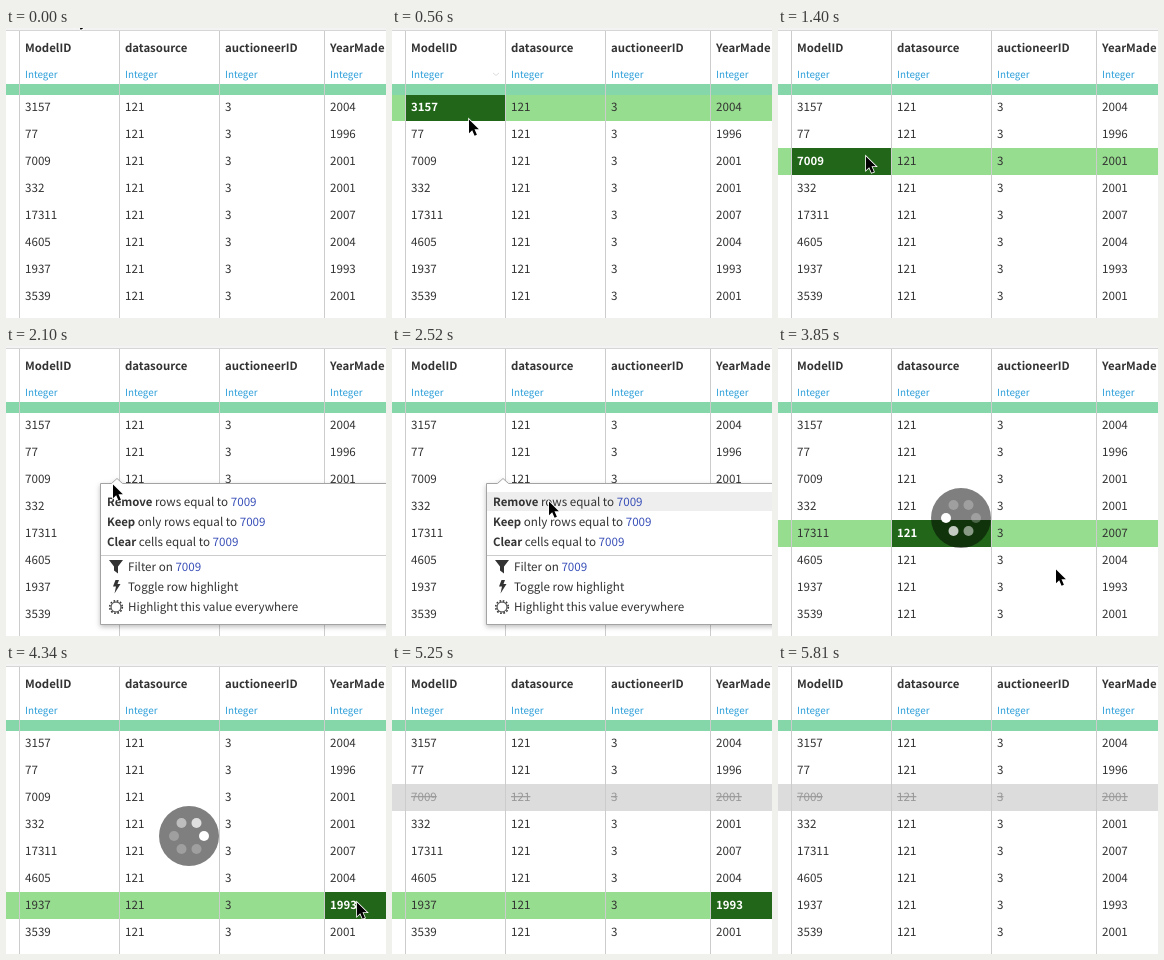
An HTML page for the animation above (6.23 s loop, 380 px wide and 290 px high).

```html
<!DOCTYPE html>
<html lang="en">
<head>
<meta charset="utf-8">
<title>Removing rows from a data table</title>
<style>
  html, body { margin: 0; width: 100%; height: 100%; overflow: hidden; background: #fff; }
  svg { display: block; }
  text {
    font: 11.64px "Noto Sans CJK JP", "Noto Sans CJK SC", "Noto Sans CJK", "Open Sans", sans-serif;
    fill: #333; text-rendering: geometricPrecision;
  }
  .bold { font-weight: 700; font-size: 11.4px; }
  .type { font-size: 9.85px; fill: #2d9fd9; }
  .active { font-weight: 700; font-size: 11.4px; fill: #fff; }
  .removed { fill: #999; text-decoration: line-through; }
  .value { fill: #3a50b8; }
  .box { filter: drop-shadow(0 2px 2.5px rgba(0, 0, 0, .25)); }
</style>
</head>
<body>
<svg id="stage" width="380" height="290" viewBox="0 0 380 290"></svg>
<script>
const LOOP = 6230, STEP = 70;
const ROW_TOP = 66, ROW_H = 27;
const edges = [13, 113, 213, 318, 418];
const headers = ['ModelID', 'datasource', 'auctioneerID', 'YearMade'];
const models = [3157, 77, 7009, 332, 17311, 4605, 1937, 3539];
const years = [2004, 1996, 2001, 2001, 2007, 2004, 1993, 2001];
const rows = models.map((m, i) => [m, 121, 3, years[i]]);

// time, x, y
const path = [
  [0, 68, -16], [280, 72, 50], [560, 76, 90], [630, 77, 95], [1120, 84, 125],
  [1260, 84, 125], [1400, 87, 127], [1750, 87, 127], [1820, 87, 130], [1960, 87, 130],
  [2240, 124, 143], [2520, 156, 154], [3290, 156, 154], [3570, 205, 186],
  [3850, 277, 222], [4060, 314, 230], [4340, 350, 237]
];
// time, row, column, opacity
const hovers = [
  [0, -1, 0, 0], [420, 0, 0, 1], [630, 1, 0, 1], [910, 2, 0, 1], [2100, -1, 0, 0],
  [3430, 3, 1, 1], [3640, 4, 1, 1], [3920, 5, 2, 1], [4200, 6, 3, 1],
  [5740, 6, 3, .5], [5810, -1, 0, 0]
];

const within = (t, a, b) => t >= a && t < b;
const rect = (x, y, w, h, fill, extra = '') =>
  `<rect x="${x}" y="${y}" width="${w}" height="${h}" fill="${fill}" ${extra}/>`;
const label = (x, y, s, cls = '') => `<text x="${x}" y="${y}" class="${cls}">${s}</text>`;

function cursorAt(t) {
  const i = path.findIndex(p => p[0] > t);
  if (i < 0) return path[path.length - 1].slice(1);
  const [t0, x0, y0] = path[i - 1], [t1, x1, y1] = path[i];
  const k = (t - t0) / (t1 - t0);
  return [x0 + (x1 - x0) * k, y0 + (y1 - y0) * k].map(Math.round);
}

function table(t) {
  const [, hotRow, hotCol, alpha] = hovers.filter(h => h[0] <= t).pop();
  const gone = t >= 4830 ? 2 : -1;
  const y = r => ROW_TOP + ROW_H * r;
  let out = rect(0, 0, 380, 2, '#f3f3f3') + rect(0, 2, 380, 1, '#d6d6d6');
  if (gone >= 0) out += rect(0, y(gone), 380, ROW_H, '#dcdcdc');
  if (hotRow >= 0) out += rect(0, y(hotRow), 380, ROW_H, '#97dd8f', `opacity="${alpha}"`);
  out += rect(0, 56, 380, 11, '#85d6a9');
  for (const x of edges) out += rect(x, 3, 1, 287, '#ccc');
  if (hotRow >= 0) {
    const x = edges[hotCol] + 1, top = Math.max(67, y(hotRow));
    out += rect(x, top, edges[hotCol + 1] - x, y(hotRow + 1) - top, '#226619', `opacity="${alpha}"`);
  }
  headers.forEach((name, c) => {
    out += label(edges[c] + 6, 24, name, 'bold') + label(edges[c] + 6, 50, 'Integer', 'type');
  });
  rows.forEach((cells, r) => cells.forEach((v, c) => {
    const cls = r === hotRow && c === hotCol ? 'active' : r === gone ? 'removed' : '';
    out += label(edges[c] + 6, y(r) + 17, v, cls);
  }));
  if (within(t, 140, 630)) {
    const tone = t < 420 ? '#aaa' : '#ddd';
    out += `<path d="M101 45l3 2.5 3-2.5" fill="none" stroke="${tone}"/>`;
  }
  return out;
}

function menu(t) {
  if (!within(t, 1680, 3290)) return '';
  const value = '<tspan class="value">7009</tspan>';
  const bold = s => `<tspan class="bold">${s}</tspan>`;
  return `<path class="box" d="M94.5 137.5H105.5L111 132.5L116.5 137.5H400V278.5H94.5Z" fill="#fff" stroke="#a3a3a3"/>`
    + (t >= 2310 ? rect(95, 146, 285, 19, '#eee') : '')
    + rect(95, 209, 285, 1, '#ccc')
    + label(101, 160, `${bold('Remove')} rows equal to ${value}`)
    + label(101, 180, `${bold('Keep')} only rows equal to ${value}`)
    + label(101, 200, `${bold('Clear')} cells equal to ${value}`)
    + label(122, 225, `Filter on ${value}`)
    + label(122, 245, 'Toggle row highlight')
    + label(122, 265, 'Highlight this value everywhere')
    + `<path d="M103 214H117L112 220.5V227.500L108 224.500V220.500Z" fill="#333"/>`
    + `<path d="M109.500 234H113L111.500 238H114.500L108.500 247.500L110 240.500H107Z" fill="#333"/>`
    + `<g fill="none" stroke="#333"><circle cx="110" cy="261" r="5"/>`
    + `<circle cx="110" cy="261" r="6.300" stroke-width="1.600" stroke-dasharray="1.650"/></g>`;
}

function spinner(t) {
  if (!within(t, 3360, 4830)) return '';
  const phase = (Math.min(t, 4690) - 3850) / 163;
  let out = '<circle cx="183" cy="172" r="30" opacity=".5"/>';
  for (let i = 0; i < 6; i++) {
    const a = Math.PI * (1 + i / 3);
    const age = (((phase - i) % 6) + 6) % 6;
    out += `<circle cx="${183 + 15 * Math.cos(a)}" cy="${172 + 15 * Math.sin(a)}" r="5"
      fill="#fff" opacity="${Math.max(.25, 1 - .25 * age)}"/>`;
  }
  return out;
}

function cursor(t) {
  if (t >= 5250) return '';
  return `<path transform="translate(${cursorAt(t)})" d="M1 1.500V15.200L4.200 12.200L6.600 17.800L8.900 16.800L6.500 11.300H10.900Z"
    stroke="#fff" stroke-width="1.600" paint-order="stroke"/>`;
}

const stage = document.getElementById('stage');
const start = performance.now();
let shown = -1;

function tick() {
  const now = Math.max(0, performance.now() - start) % LOOP;
  const t = Math.floor(now / STEP) * STEP;
  if (t !== shown) {
    shown = t;
    stage.innerHTML = table(t) + menu(t) + spinner(t) + cursor(t);
  }
  requestAnimationFrame(tick);
}
tick();
</script>
</body>
</html>
```
